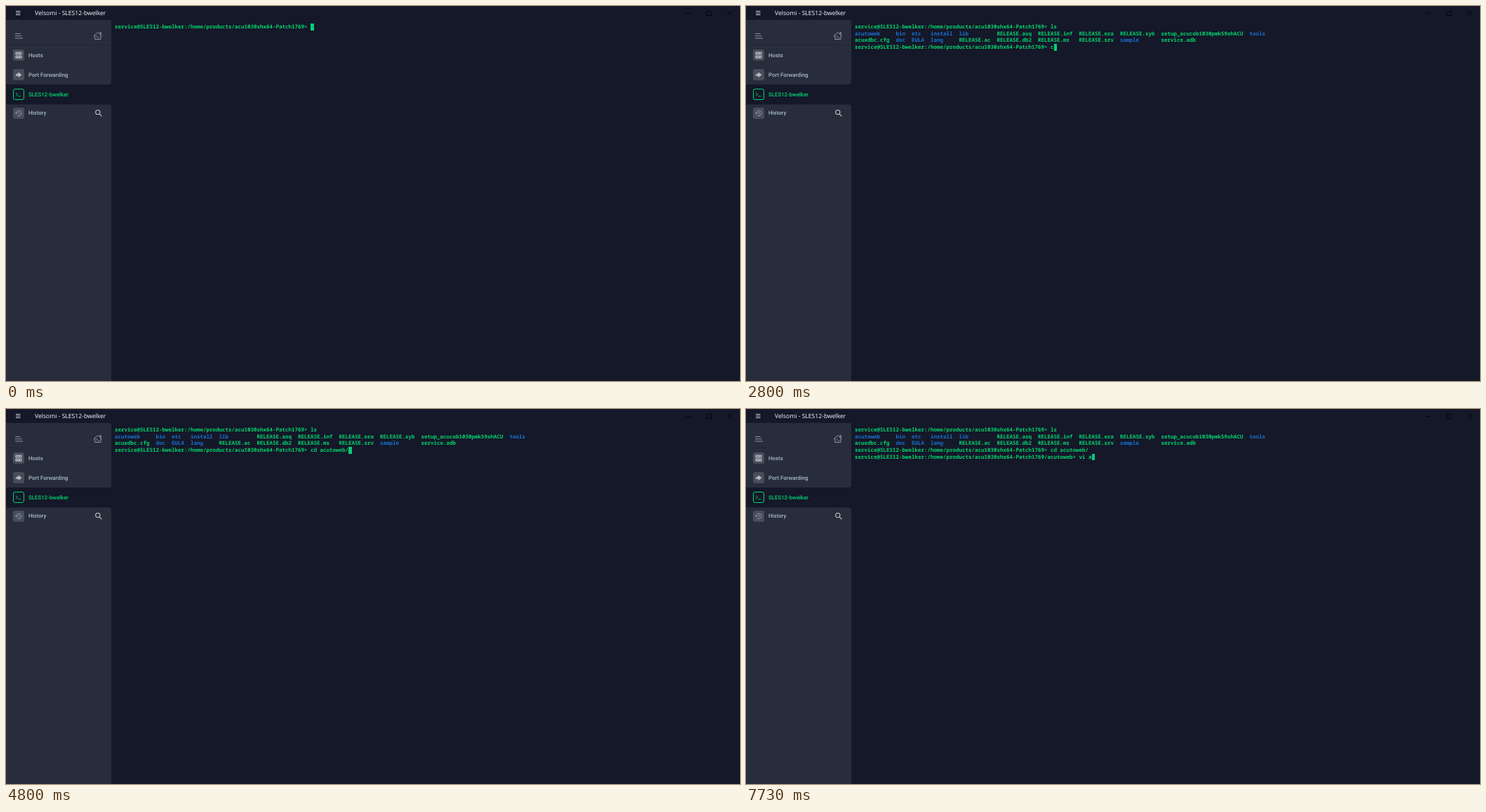
Write an HTML page that moves like this. It is 1046 by 535 pixels and loops after 8000 ms.

```html
<!DOCTYPE html>
<html lang="en">
<head>
<meta charset="utf-8">
<title>Terminal session</title>
<style>
  html, body { margin: 0; width: 100%; height: 100%; overflow: hidden; background: #141829; }
  svg { position: absolute; left: 0; top: 0; display: block; }
  text { text-rendering: geometricPrecision; }
  .title { font: 500 8.6px "Open Sans", sans-serif; fill: #fff; }
  .label { font: 500 7.85px Roboto, sans-serif; fill: #a9bccb; }
  .active { fill: #04d46c; }
  .line { fill: none; stroke: #98a2ad; stroke-width: .9; }
  .tile { fill: #474d5a; }
  .controls { fill: none; stroke: #04050a; stroke-width: 1; }
  #term {
    position: absolute; left: 155px; top: 25.1px; margin: 0; white-space: pre;
    font: 600 7.5px/11.6px "Noto Sans Mono", monospace;
    text-rendering: geometricPrecision; font-kerning: none; font-variant-ligatures: none;
    color: #04d46c;
  }
  #term div { height: 9.62px; }
  #term b { font-weight: 700; color: #1b70d0; }
  #term i { display: inline-block; width: 4.5px; height: 9.62px; vertical-align: top; background: #06cc78; }
</style>
</head>
<body>
<svg width="1046" height="535" viewBox="0 0 1046 535">
  <!-- title bar -->
  <path d="M14 7.5h6.5M14 10h6.5M14 12.5h6.5" stroke="#e4e6ea" stroke-width=".9"/>
  <text class="title" x="41" y="13">Velsomi - SLES12-bwelker</text>
  <g class="controls">
    <path d="M968.5 10.5h7M1028 7.2l6.4 6.4M1034.4 7.2l-6.4 6.4"/>
    <rect x="998.5" y="7.5" width="6.5" height="6"/>
  </g>

  <!-- sidebar -->
  <g fill="#282d3b">
    <path d="M0 20H147a3 3 0 0 1 3 3V109a3 3 0 0 1-3 3H0z"/>
    <path d="M0 140.5H147a3 3 0 0 1 3 3V535H0z"/>
  </g>
  <path d="M0 55.5H150" stroke="#212634"/>
  <path class="line" d="M13 39.5h7.5M13 42.7h9.5M13 46h11"/>
  <path class="line" d="M124.8 43l6-5.3 6 5.3M126.7 42v5.5h8.3V42M134 40v-2.3h1.3v3.4M128.8 42.2l1.5 1.3-1.5 1.3M131 45.3h2"/>

  <g class="tile">
    <rect x="10" y="62" width="16" height="16" rx="3"/>
    <rect x="10" y="90" width="16" height="16" rx="3"/>
    <rect x="10" y="145" width="16" height="16" rx="3"/>
  </g>
  <g fill="#b4bcc5">
    <rect x="13.5" y="65.5" width="9" height="4" rx=".6"/>
    <rect x="13.5" y="70.7" width="9" height="4" rx=".6"/>
    <path d="M17.5 94.3l5 3.9-5 3.9v-2.3h-1.5v-3.2h1.5zM13.3 99.8l1.7-3.2h.9v3.2z"/>
  </g>
  <path d="M15 67.5h1.2M17.3 67.5h1.2M20 67.5h1.3M15 72.7h1.2M17.3 72.7h1.2M20 72.7h1.3" stroke="#474d5a" stroke-width="1.3"/>
  <g fill="none" stroke="#04d46c">
    <rect x="10.5" y="118.5" width="15" height="15" rx="2.5"/>
    <path d="M14 123.7l2.8 2.3-2.8 2.3M17.6 128.7h3.4" stroke-width=".9"/>
  </g>
  <path class="line" d="M14.7 153a3.7 3.7 0 1 1 1.1 2.6M18.4 150.8v2.4l1.7 1"/>
  <path d="M12.9 152.3h3.6l-1.8 2z" fill="#98a2ad"/>
  <g fill="none" stroke="#c3cad1" stroke-width="1.1">
    <circle cx="130.8" cy="151.6" r="3.1"/>
    <path d="M133.1 153.9l3.4 3.4"/>
  </g>

  <text class="label" x="32" y="72.6">Hosts</text>
  <text class="label" x="32" y="100.8">Port Forwarding</text>
  <text class="label active" x="32" y="129">SLES12-bwelker</text>
  <text class="label" x="32" y="155.3">History</text>
</svg>
<div id="term"></div>

<script>
const LOOP = 8000;
const term = document.getElementById('term');
const home = 'service@SLES12-bwelker:/home/products/acu1030shx64-Patch1769';
const dirs = /\b(acutoweb|bin|etc|install|lib|doc|EULA|lang|sample|tools)\b/g;

// Column starts of the directory listing, and its two rows
const cols = [0, 13, 18, 24, 33, 45, 58, 71, 84, 97, 125];
const rows = [
  'acutoweb bin etc install lib RELEASE.asq RELEASE.inf RELEASE.ora RELEASE.syb setup_acucob1030pmk59shACU tools',
  'acuxdbc.cfg doc EULA lang RELEASE.ac RELEASE.db2 RELEASE.ms RELEASE.srv sample service.adb'
];
const listing = rows.map(row => row.split(' ')
  .reduce((line, name, i) => line.padEnd(cols[i]) + name, '')
  .replace(dirs, '<b>$1</b>'));

const prompt = (dir, cmd) => `${home}${dir}&gt; ${cmd}`;
const afterLs = [prompt('', 'ls'), ...listing];
const afterCd = [...afterLs, prompt('', 'cd acutoweb/')];

// Each stage: finished lines, working directory, [time, typed text] pairs
const stages = [
  [[], '', [[0, ''], [930, 'l'], [1070, 'ls']]],
  [afterLs, '', [[1530, ''], [2800, 'c'], [2930, 'cd'], [3330, 'cd '], [3600, 'cd a'],
    [3800, 'cd ac'], [3930, 'cd acu'], [4330, 'cd acut'], [4800, 'cd acutoweb/']]],
  [afterCd, '/acutoweb', [[5730, ''], [7270, 'v'], [7400, 'vi'], [7600, 'vi '], [7730, 'vi a']]]
];
const steps = stages.flatMap(([done, dir, keys]) => keys.map(([at, cmd]) => ({
  at,
  html: [...done, prompt(dir, cmd) + '<i></i>'].map(line => `<div>${line}</div>`).join('')
})));

let shown;
function draw() {
  const t = performance.now() % LOOP;
  const step = steps.filter(s => s.at <= t).pop();
  if (step !== shown) {
    term.innerHTML = step.html;
    shown = step;
  }
  requestAnimationFrame(draw);
}
draw();
</script>
</body>
</html>
```
